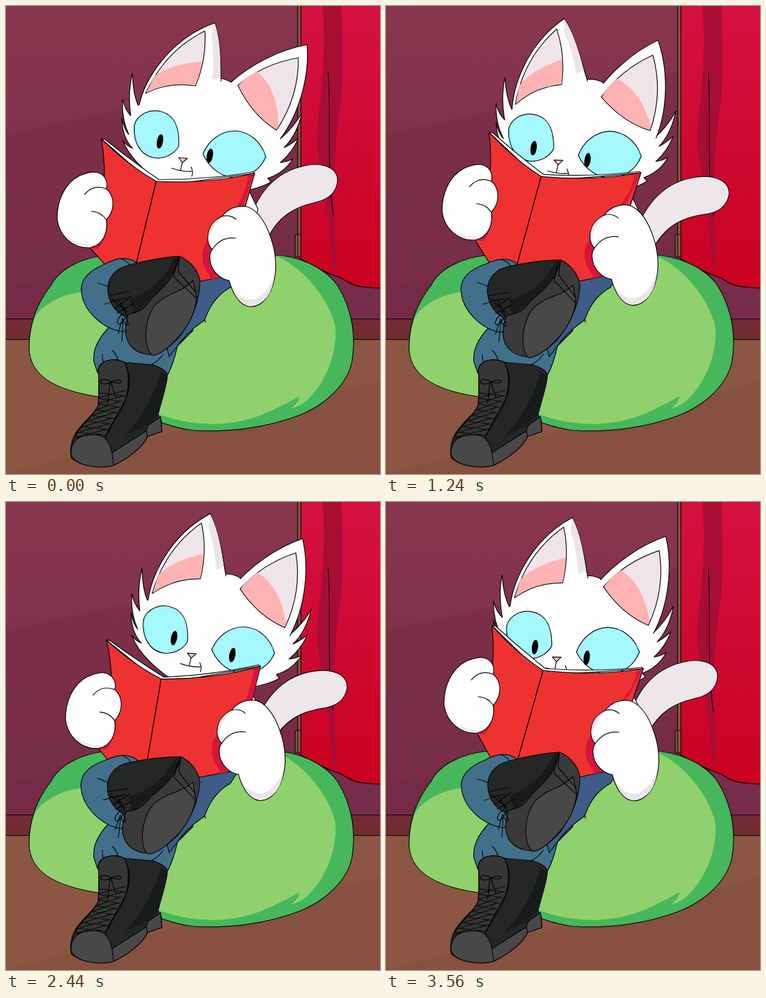
Recreate the animation shown at these times as an HTML page. Size 600 by 750 pixels, loop 3.6 s.

```html
<!DOCTYPE html>
<html lang="en">
<head>
<meta charset="utf-8">
<title>Reading cat</title>
<style>
  html, body { margin: 0; width: 100%; height: 100%; overflow: hidden; }
  svg { display: block; width: 600px; height: 750px; }
  path, ellipse { stroke: #000; stroke-width: 1.2; stroke-linejoin: round; stroke-linecap: round; }
  .flat, .flat path { stroke: none; }
  .line, .line path { fill: none; }
  .white { fill: #fefefe; }
  .fur { fill: #ede6ea; }
  .shade { fill: #ece4e9; stroke: none; }
  .pink { fill: #feb2b1; stroke: none; }
  .red { fill: #ee3231; }
  .crimson { fill: #d5153a; stroke: none; }
  .jeans { fill: #42708b; }
  .navy { fill: #3d5c87; }
  .leather { fill: #242725; }
  .sole { fill: #484848; }
</style>
</head>
<body>
<svg viewBox="0 0 600 750">
  <defs>
    <linearGradient id="wall" x2="0" y2="1">
      <stop stop-color="#89364e"/><stop offset="1" stop-color="#762c49"/>
    </linearGradient>
    <linearGradient id="curtain" x2="0" y2="1">
      <stop stop-color="#d51143"/><stop offset="1" stop-color="#c8021f"/>
    </linearGradient>
  </defs>

  <g class="flat">
    <path fill="url(#wall)" d="M0 0H600V502H0Z"/>
    <path fill="#782d48" opacity=".65" d="M0 205L470 105V502H0Z"/>
    <path fill="#702845" opacity=".35" d="M0 452L470 340V502H0Z"/>
    <path fill="#722b32" d="M0 502H600V534H0Z"/>
    <path fill="#8b5743" d="M0 534H600V750H0Z"/>
    <path fill="#86513f" d="M0 750L600 601V750Z"/>
  </g>
  <path class="line" d="M0 501.500H600M0 534.500H600"/>
  <path fill="url(#curtain)" d="M472 -2V405C500 420 518 430 538 436C552 446 560 451 603 452V-2Z"/>
  <path class="flat" fill="#a80d35" d="M508 0H538C541 80 541 130 534 180C525 240 526 330 530 420H523C520 320 496 240 499 200C507 130 513 80 508 0Z"/>
  <path class="line" d="M517 106C522 190 514 260 525 335"/>
  <path fill="#8a5b42" d="M468 -2H473V402H468ZM464 366H473V402H464Z"/>

  <path id="tail" class="fur" d="M390 345C404 300 430 268 475 257C506 249 532 258 532 280C530 300 515 311 495 315C465 322 438 335 420 372L400 395Z"/>

  <path fill="#47b75c" d="M165 399C120 403 85 422 72 448C50 476 37 510 37 548C38 590 75 615 147 626C200 642 245 674 300 680C360 684 420 675 470 656C515 638 548 605 555 570C561 535 558 490 532 448C512 420 470 399 425 399Z"/>
  <path class="flat" fill="#90d16e" d="M47 497C66 473 92 462 124 458L200 420L436 402C470 416 514 460 528 512C532 545 520 590 492 622C480 636 470 642 457 645C466 638 470 632 471 625C445 640 430 647 418 652C370 673 310 677 250 656L147 625C75 614 38 590 38 548C38 527 42 510 47 497Z"/>

  <path class="jeans" d="M165 515C146 535 139 553 141 570L147 588L260 590C268 575 272 558 275 545L300 520L250 480Z"/>
  <path class="navy" d="M285 415L372 432L360 451C340 462 328 478 320 500L318 504C300 516 285 530 275 545L262 562L250 520Z"/>
  <path class="line" d="M319 503L320 507M155 558C153 568 158 574 165 577M181 570Q178 560 171 552M233 575Q246 568 252 558"/>
  <path class="white" d="M250 285L388 292L404 325L390 400H230Z"/>

  <g id="head">
    <path class="white" d="M213 162Q203 140 203 108Q195 138 200 176Q190 165 187 149Q185 180 197 206Q189 197 186 179Q186 210 203 228Q193 224 187 215Q200 248 244 280L300 310L393 294Q414 289 425 282Q422 279 420 276Q446 268 460 245Q450 250 440 251Q459 235 469 212Q457 222 446 227Q466 208 475 171Q462 194 441 212L400 150Q380 130 361 122Q352 117 344 116Q300 112 240 150Z"/>
    <path class="white earL" d="M213 162C222 115 265 52 335 27C343 50 345 85 345 118L346 150"/>
    <path class="white earR" d="M361 122C395 92 440 70 483 62C487 110 472 170 440 213"/>
    <path class="white flat" d="M207 163Q262 126 330 118L362 124L400 153L439 212L420 255L210 220Z"/>
    <g class="earL">
      <path class="shade" d="M335 28C343 50 345 85 344 115L331 118Q335 80 329 48Z"/>
      <path fill="#efe4ea" d="M319 40Q255 72 224 140Q262 121 304 128Q322 85 319 40Z"/>
      <path class="pink" d="M238 112Q265 93 314 89Q311 110 304 127Q262 120 225 139Z"/>
    </g>
    <g class="earR">
      <path fill="#efe4ea" d="M469 83Q412 93 372 127Q395 175 434 199Q470 145 469 83Z"/>
      <path class="pink" d="M373 127Q385 114 403 105Q436 132 437 192L434 198Q395 174 373 127Z"/>
    </g>
    <g fill="#a5f8fe">
      <path d="M206 190C212 172 232 165 248 169C268 174 279 190 277 225C268 240 250 246 236 243C214 238 203 215 206 190Z"/>
      <path d="M316 237C325 215 345 200 368 200C392 202 410 218 417 242C408 262 390 275 365 275C345 273 326 260 316 237Z"/>
    </g>
    <path class="line" style="stroke:#16b9ea" d="M207 190Q205 203 209 216M413 232L416 242L411 251"/>
    <g id="pupilL"><ellipse cx="247" cy="217" rx="4.300" ry="11" transform="rotate(10 247 217)"/></g>
    <g id="pupilR"><ellipse cx="327" cy="240" rx="4.300" ry="11" transform="rotate(10 327 240)"/></g>
    <path fill="#fec3bd" d="M277 243L291 244L283 251Z"/>
    <path class="line" d="M283 251L280 263M266 260Q283 266 299 265M297 258Q301 266 298 273"/>
  </g>

  <path id="pages" class="white"/>
  <path id="coverL" class="red"/>
  <path id="coverR" class="red"/>
  <path id="coverEdge" class="crimson"/>

  <g id="leg">
    <path class="jeans" d="M210 412C198 402 180 402 160 413C130 425 119 440 121 458C124 490 158 520 190 522L215 480Z"/>
    <path class="line" d="M184 405Q198 410 199 418M147 444Q162 448 166 452M158 478Q170 475 174 470"/>
    <path class="leather" d="M178 424C185 415 250 402 278 401C286 420 262 450 240 470L205 500C188 502 168 485 164 462C161 444 168 432 178 424Z"/>
    <path class="flat" fill="#191b1a" d="M269 404L277 402Q275 430 235 466L205 495L199 470Q250 450 269 404Z"/>
    <path fill="#3a3a3a" d="M278 401C290 405 308 420 311 440C311 470 300 500 280 528C262 548 243 562 225 558C205 555 190 540 192 515Q193 500 197 494C217 490 222 485 235 467C258 447 274 428 278 401Z"/>
    <path class="sole" d="M306 468C303 494 291 514 279 528C262 547 248 559 235 560C221 550 219 505 240 478Q255 465 273 458Q291 450 300 440Z"/>
    <path class="line" d="M273 412L269 434L305 468M278 401L276 425L305 459"/>
    <path class="line" d="M166 464L198 457M169 473L192 468M174 485L201 465M169 469L194 489M181 471L195 497M178 492L204 477M186 494C170 510 185 518 191 499C201 510 194 520 187 500L180 525M188 502L186 537"/>
  </g>

  <g id="handL">
    <path class="crimson" d="M162 340Q166 365 148 389L135 388Z"/>
    <path class="white" d="M150 268C160 272 164 284 161 293C173 303 177 325 161 343C164 362 156 383 136 387C110 390 85 370 82 340C82 315 92 285 118 272C130 267 142 264 150 268Z"/>
    <path class="shade" d="M92 365Q107 385 136 386L145 383Q113 384 92 365Z"/>
    <path class="line" d="M161 293Q140 285 126 302M161 343Q153 330 137 329"/>
  </g>
  <g id="handR">
    <path class="crimson" d="M330 345Q330 368 318 385Q309 410 326 430L329 439L345 435L335 380Z"/>
    <path class="white" d="M347 337C355 325 372 318 388 322C405 328 418 350 425 372C433 395 435 420 430 440C425 462 412 482 392 482C372 480 362 455 358 440C345 438 327 425 327 403Q327 395 331 390C319 380 320 350 347 337Z"/>
    <path class="shade" d="M363 452Q380 474 398 470Q420 462 431 430Q426 478 392 481Q373 479 363 452ZM325 377Q329 357 345 339Q322 350 325 377Z"/>
    <path class="line" d="M347 337Q360 334 369 342M331 390Q345 369 369 372"/>
  </g>

  <g>
    <path class="leather" d="M148 583C150 569 170 562 190 571L235 575C250 579 258 586 259 592C258 610 247 640 244 655L249 664L250 682L227 690C220 707 194 726 173 736C155 742 118 737 105 724C101 710 106 688 120 674C129 661 146 651 148 638C149 620 150 600 148 583Z"/>
    <path class="flat" fill="#191b1a" d="M258 592Q256 615 244 655L226 672L190 690Q235 640 248 585Z"/>
    <path fill="#353735" d="M148 583C150 569 170 562 190 571Q200 590 194 622C188 650 165 675 158 694L112 690C110 682 140 659 148 640Q150 605 148 583Z"/>
    <path class="sole" d="M104 718C104 700 112 690 132 688C155 684 166 694 170 716L225 681L228 672L248 658L250 682L227 690C220 707 194 726 173 736C155 742 110 739 104 718Z"/>
    <path class="line" d="M170 716L173 736M225 681L227 690M190 571Q205 600 192 630Q175 660 160 688"/>
    <path id="laces" class="line"/>
    <path class="line" d="M167 601C145 592 148 613 168 603C190 592 191 610 167 602L163 637M168 602L176 627"/>
  </g>
</svg>
<script>
const LOOP = 3600, STEP = 40;
const el = id => document.getElementById(id);
const place = (id, transform) => el(id).setAttribute('transform', transform);
const shift = (id, [x, y]) => place(id, `translate(${x} ${y})`);
const turn = (name, angle, x, y) => document.querySelectorAll('.' + name)
  .forEach(e => e.setAttribute('transform', `rotate(${angle} ${x} ${y})`));

const ramp = (t, from, to) => Math.min(1, Math.max(0, (t - from) / (to - from)));
const ease = (t, from, to) => { const u = ramp(t, from, to); return u * u * (3 - 2 * u); };
const pulse = (t, on, onEnd, off, offEnd) => ease(t, on, onEnd) - ease(t, off, offEnd);

function drawBook([lx, ly], [sx, sy], [rx, ry], [fx, fy], [hx, hy], [kx, ky]) {
  const set = (id, d) => el(id).setAttribute('d', d);
  const ml = [(lx + sx) / 2 - 3, (ly + sy) / 2 + 7], mr = [(sx + rx) / 2 + 4, (sy + ry) / 2 + 11];
  set('pages', `M${lx} ${ly}L${lx + 6} ${ly + 1}Q${ml[0] + 6} ${ml[1] - 7} ${sx + 4} ${sy - 3}` +
    `Q${mr[0]} ${mr[1] - 7} ${rx - 3} ${ry - 2}L${rx} ${ry}L${sx} ${sy + 8}Z`);
  set('coverL', `M${lx} ${ly}Q${ml} ${sx} ${sy}L${fx} ${fy}L${162 + hx * .6} ${418 + hy * .4}` +
    `L${136 + hx} ${389 + hy}Q${168 + hx} ${295 + hy} ${lx} ${ly}Z`);
  set('coverR', `M${sx} ${sy}Q${mr} ${rx} ${ry}L${352 + kx} ${434 + ky}L300 443L${fx} ${fy}Z`);
  set('coverEdge', `M${rx - 1} ${ry + 1}L${rx - 11} ${ry + 4}Q${rx - 13} ${ry + 30} ` +
    `${365 + kx} ${330 + ky}L${380 + kx} ${321 + ky}Z`);
}

function draw(t) {
  // The cat reads down the left page, swings to the right page, reads it and swings back.
  const side = pulse(t, 1740, 2040, 3360, 3560);
  const left = ramp(t, 0, 1720) * (1 - side), right = ramp(t, 2040, 3360) * side;
  const mix = (rest, onLeft, onSide, onRight, s = side) =>
    rest.map((v, i) => v + left * onLeft[i] + s * onSide[i] + right * onRight[i]);

  const [x, y, tilt] = mix([0, 0, 0], [-10, 5, -2.8], [14, -3, .6], [0, 7, 0]);
  place('head', `translate(${x} ${y}) rotate(${tilt} 284 246)`);
  const perk = -10 * (ease(t, 0, 400) - ramp(t, 3400, 3600)) - 3.8 * left + 3 * right;
  turn('earL', perk, 274, 173);
  turn('earR', perk, 444, 206);

  // The left eye's glance lags behind the head on the way back.
  shift('pupilL', mix([0, 0], [-3, 8], [8, 1], [1, 4], pulse(t, 1740, 2040, 3540, 3600)));
  shift('pupilR', mix([0, 0], [5, 7], [23, 3], [-3, 8]));

  const handL = mix([0, 0], [11, -17], [14, 10], [-2, -8]);
  const handR = mix([0, 0], [5, -3], [16, -1], [-3, -8]);
  shift('handL', handL);
  shift('handR', handR);
  drawBook(
    mix([153, 213], [17, -15], [8, 10], [0, -6]),
    mix([241, 281], [11, -11], [8, 5], [0, -8]),
    mix([399, 268], [14, -1], [9, -3], [1, -6]),
    mix([206, 425], [2, 0], [20, 0], [-4, 0]), handL, handR);

  const wag = pulse(t, 400, 1150, 2200, 3100);
  place('tail', `translate(${14 * wag} ${12 * wag}) rotate(${5 * wag} 415 335)`);
  place('leg', `rotate(${4 * pulse(t, 200, 1700, 2200, 3560)} 165 445)`);
}

let laces = '';
for (let i = 0; i < 8; i++) {
  const y = 620 + i * 9, bend = Math.max(0, i - 2) * 7;
  laces += `M${150 - bend} ${y}L${191 - i * 4.5} ${y + 5}M${148 - bend} ${y + 8}L${191 - i * 4.5} ${y - 4}`;
}
el('laces').setAttribute('d', laces);

function tick() {
  const t = performance.now() % LOOP;
  draw(t - t % STEP);
  requestAnimationFrame(tick);
}
tick();
</script>
</body>
</html>
```
